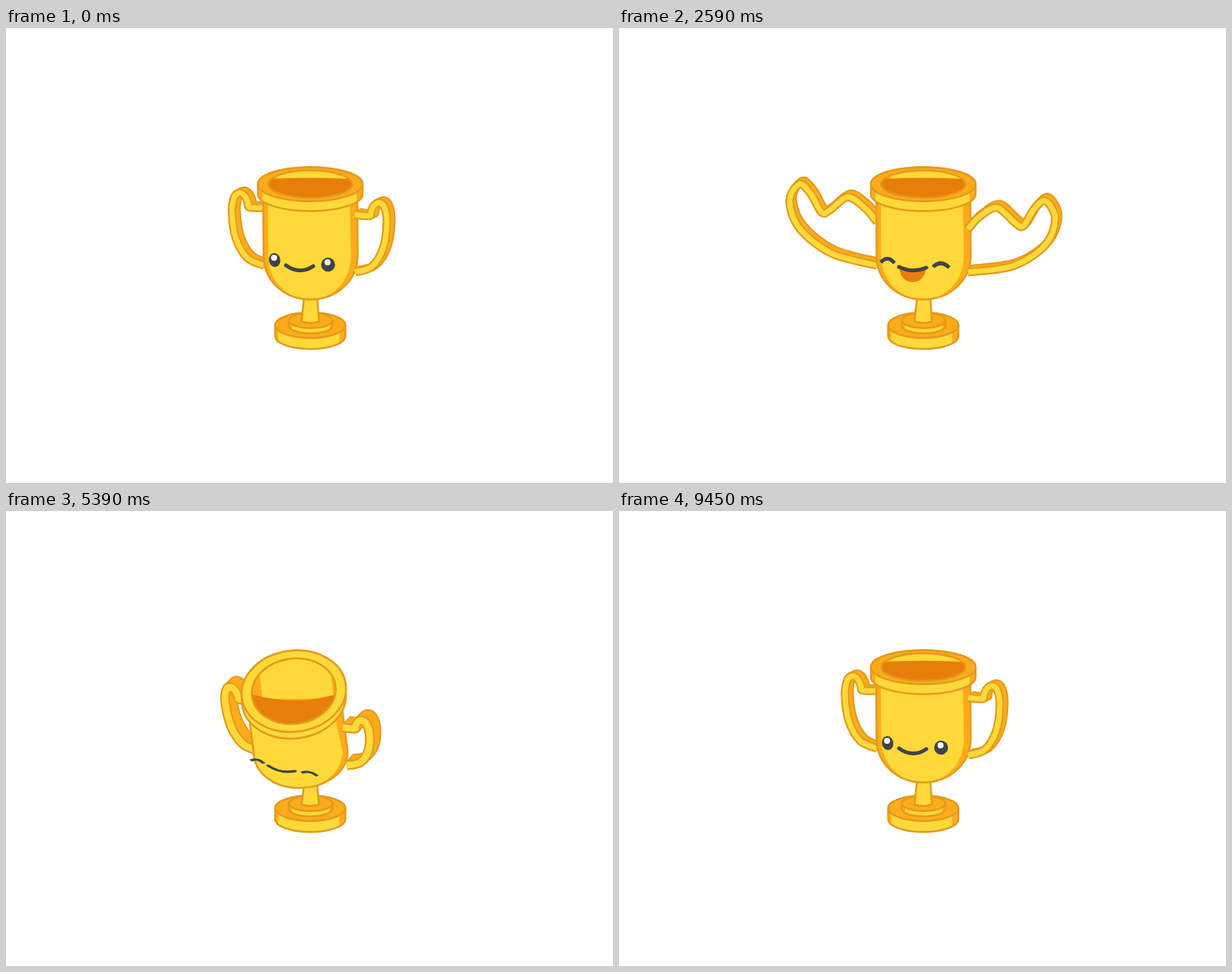
Write an HTML page with a canvas that moves like this. It is 800 by 600 pixels and loops after 9.87 s.

```html
<!DOCTYPE html>
<html lang="en">
<head>
<meta charset="utf-8">
<title>Trophy</title>
<style>
html, body { margin: 0; width: 100%; height: 100%; overflow: hidden; background: #fff; }
canvas { display: block; }
</style>
</head>
<body>
<canvas id="stage" width="800" height="600"></canvas>
<script>
const ctx = document.getElementById('stage').getContext('2d');
const LOOP = 9870, STEP = 70, BOWS = [4060, 7070];
const YELLOW = '#ffd939', ORANGE = '#ffab1a', LINE = '#e39a1d', DEEP = '#e87e0a', DARK = '#404447';
const VIEW = .332;          // camera elevation: how far the upright cup opens to the viewer
const JOINT_Y = 313;        // lower joint of the handles

// Handle key points as [distance from the cup, y], upper joint to lower joint.
const RELAXED = [[0, 237], [11, 237], [20, 236], [21, 231], [25, 222], [32, 217.5], [39, 223], [42, 243], [37, 277], [22, 303], [0, JOINT_Y]];
const FLEXED = [[0, 256], [14, 239], [38, 223], [62, 240], [73, 243], [87, 219], [102, 206], [115, 228], [102, 264], [60, 297], [0, JOINT_Y]];

const clamp = v => Math.max(0, Math.min(1, v));
const lerp = (a, b, k) => a + (b - a) * k;
const smooth = v => { v = clamp(v); return v * v * (3 - 2 * v); };
const ramp = (t, a, b) => smooth((t - a) / (b - a));

function paint(fill, stroke, width = 2.5) {
  if (fill) { ctx.fillStyle = fill; ctx.fill(); }
  if (stroke) { ctx.strokeStyle = stroke; ctx.lineWidth = width; ctx.stroke(); }
}

function ellipse(x, y, a, b, rot = 0) {
  ctx.beginPath();
  ctx.ellipse(x, y, a, b, rot, 0, Math.PI * 2);
}

function disc({ x, y, a, b, rot = 0, height, top, left, right }) {
  const side = () => {
    ctx.beginPath();
    ctx.ellipse(x, y + height, a, b, rot, 0, Math.PI);
    ctx.ellipse(x, y, a, b, rot, Math.PI, Math.PI * 2);
    ctx.closePath();
  };
  side();
  paint(YELLOW);
  ctx.save();
  ctx.clip();
  ctx.fillStyle = ORANGE;
  ctx.fillRect(x - a - 4, y - 100, left + 4, 220);
  ctx.fillRect(x + a - right, y - 100, right + 4, 220);
  ctx.restore();
  side();
  paint(null, LINE);
  ellipse(x, y, a, b, rot);
  paint(top, LINE);
}

function curve(points, dx, dy) {
  const last = points.length - 1;
  const at = i => points[Math.max(0, Math.min(last, i))];
  ctx.beginPath();
  ctx.moveTo(at(0)[0] + dx, at(0)[1] + dy);
  for (let i = 0; i < last; i++) {
    const [a, b, c, d] = [at(i - 1), at(i), at(i + 1), at(i + 2)];
    ctx.bezierCurveTo(
      b[0] + (c[0] - a[0]) / 6 + dx, b[1] + (c[1] - a[1]) / 6 + dy,
      c[0] - (d[0] - b[0]) / 6 + dx, c[1] - (d[1] - b[1]) / 6 + dy,
      c[0] + dx, c[1] + dy);
  }
}

// side is -1 for the left handle and 1 for the right, nearer one
function drawHandle(side, { q, flex, reach }) {
  const near = (side + 1) / 2, q2 = q * q;
  const points = RELAXED.map(([d0, y0], i) => {
    const [d1, y1] = FLEXED[i];
    const d = lerp(d0, d1 * (1 + .31 * reach), flex);
    const y = lerp(y0, 285 + (y1 - 285) * (1 - .22 * reach), flex);
    const rise = (y - JOINT_Y) * (1 - (.4 + .7 * near) * q2);
    return [
      400 + side * (60 + d * (1 - .5 * q2)) + .2 * q * rise - 5 * q * near,
      JOINT_Y + rise + 5 * q + near * (9 + .125 * d + 19 * q)
    ];
  });
  const dx = lerp(6 + 5 * q, 4, flex), dy = lerp(-3 - 10 * q, -4.5, flex);
  const core = 7 + 3 * Math.max(0, q), rim = core + 4;
  const sweep = (color, width) => {
    for (let k = 0; k <= 1; k += .2) {
      curve(points, dx * k, dy * k);
      paint(null, color, width);
    }
  };
  ctx.lineJoin = 'round';
  sweep(LINE, rim);
  sweep(ORANGE, core);
  curve(points, 0, 0);
  paint(null, LINE, rim);
  paint(null, YELLOW, core);
}

function drawBody({ q, rim, bottom }) {
  const middle = 401.5 - 9 * q, low = 300 + 30 * q, half = 62;
  const outline = (left, rightTop, rightLow) => {
    const l = middle - half + left, r = middle + half - rightLow;
    const drop = lerp(low, bottom.y, .58);
    ctx.beginPath();
    ctx.moveTo(rim.x - half + left, rim.y + 10);
    ctx.lineTo(l, low);
    ctx.bezierCurveTo(l, drop, lerp(bottom.x, l, .55), bottom.y, bottom.x, bottom.y);
    ctx.bezierCurveTo(lerp(bottom.x, r, .55), bottom.y, r, drop, r, low);
    ctx.lineTo(rim.x + half - rightTop, rim.y + 10);
    ctx.closePath();
  };
  outline(0, 0, 0);
  paint(ORANGE);
  outline(6 - 9 * q, 10 + 5 * q, 9 - 4 * q);
  paint(YELLOW);
  outline(0, 0, 0);
  paint(null, LINE);
}

function arc(halfWidth, y0, bend, y1, cap) {
  ctx.beginPath();
  ctx.moveTo(-halfWidth, y0);
  ctx.quadraticCurveTo(0, bend, halfWidth, y1);
  ctx.lineCap = cap;
  paint(null, DARK, 5);
  ctx.lineCap = 'butt';
}

function drawEye(x, y, rx, happy) {
  ctx.save();
  ctx.translate(x, y);
  if (happy) {
    arc(rx + 1.5, 2, -8, 3, 'butt');
  } else {
    ellipse(0, -1, rx, 9.2, rx < 9 ? -.2 : 0);
    paint(DARK);
    ellipse(-.7, -4, 4, 4);
    paint('#fff');
  }
  ctx.restore();
}

function drawFace({ q, happy, laugh }) {
  ctx.save();
  ctx.translate(387 - 11 * q - 30 * q * q, 313 + 47 * q);
  ctx.rotate(.33 * q);
  ctx.scale(1, Math.min(1, 1 - .75 * q));
  drawEye(-33, -6, 7.5, happy);
  drawEye(37.5, 0, 9.2, happy);
  if (laugh > .02) {
    ctx.beginPath();
    ctx.moveTo(-17, 4);
    ctx.bezierCurveTo(-17, 4 + 24 * laugh, 17, 4 + 24 * laugh, 17, 4);
    paint(DEEP);
  }
  arc(18, 2 * laugh, 13 - 2 * laugh, 1 + 2 * laugh, 'round');
  ctx.restore();
}

function drawRim({ q, rim, open, tall }) {
  const { x, y, rot } = rim;
  const lit = clamp(q * 2.2), a = 55.5, b = a * open;
  disc({
    ...rim, a: 69, b: 69 * open, height: 13.8 * tall,
    top: `rgb(255,${171 + 46 * lit},${26 + 31 * lit})`,
    left: 6 - 10 * q, right: 8 - 7 * q
  });
  ellipse(x, y, a, b, rot);
  paint(ORANGE);
  ctx.save();
  ctx.clip();
  ctx.beginPath();
  ctx.moveTo(x - 50, y - 60);
  ctx.lineTo(x + 44, y - 60);
  ctx.lineTo(x + 53, y + 10);
  ctx.lineTo(x - 41, y + 10);
  paint(YELLOW);
  const shore = y - 7 + 20 * q;
  ctx.beginPath();
  ctx.moveTo(x - a, shore);
  ctx.quadraticCurveTo(x, y - 10 + 54 * q, x + a, shore);
  ctx.lineTo(x + a, y + 80);
  ctx.lineTo(x - a, y + 80);
  paint(DEEP);
  ctx.restore();
  ellipse(x, y, a, b, rot);
  paint(null, LINE);
}

function drawBase(bottom) {
  disc({ x: 401, y: 392, a: 46.3, b: 16.7, height: 14.5, top: ORANGE, left: 4, right: 8 });
  disc({ x: 401.5, y: 385.7, a: 28.7, b: 10, height: 7, top: ORANGE, left: 4, right: 4 });
  ctx.beginPath();
  ctx.moveTo(393, bottom.y - 5);
  ctx.lineTo(389.5, 387);
  ctx.quadraticCurveTo(401, 391, 412.5, 387);
  ctx.lineTo(410, bottom.y - 5);
  paint(YELLOW, LINE);
}

// Lean back, bow, then rock back to rest.
function bowAngle(u) {
  return -.18 * ramp(u, 0, 300) + .78 * ramp(u, 420, 850)
    - .645 * ramp(u, 1250, 1750) + .075 * ramp(u, 1750, 2150) - .03 * ramp(u, 2150, 2380);
}

function stateAt(t) {
  const second = t >= BOWS[1];
  const u = t - BOWS[second ? 1 : 0];
  const q = bowAngle(u), open = Math.sin(VIEW + q), tall = Math.cos(VIEW + q);
  const pumping = t > 1120 && t < 3080;
  return {
    q, open, tall,
    rim: { x: 401 - 24 * q, y: 301.4 - 101 * tall, rot: -.23 * q },
    bottom: { x: 401 - 13 * q, y: 358 + 13 * q },
    sway: second ? 0 : -15 * Math.max(0, q),
    flex: ramp(t, 0, 560) - ramp(t, 3150, 3780),
    reach: ramp(t, 70, 560) - ramp(t, 700, 1120)
      + (pumping ? .64 * Math.sin(Math.PI * (t - 1120) / 490) ** 2 : 0),
    laugh: ramp(t, 70, 420) - ramp(t, 3290, 3640),
    happy: (t >= 210 && t < 3570) || (u >= 140 && u < 1960)
  };
}

function render(t) {
  const s = stateAt(t);
  ctx.fillStyle = '#fff';
  ctx.fillRect(0, 0, 800, 600);
  drawBase(s.bottom);
  ctx.save();
  ctx.translate(s.sway, 0);
  drawHandle(-1, s);
  drawBody(s);
  drawHandle(1, s);
  drawFace(s);
  drawRim(s);
  ctx.restore();
}

const start = performance.now();
function tick() {
  const t = (performance.now() - start) % LOOP;
  render(Math.floor(t / STEP) * STEP);
  requestAnimationFrame(tick);
}
tick();
</script>
</body>
</html>
```
